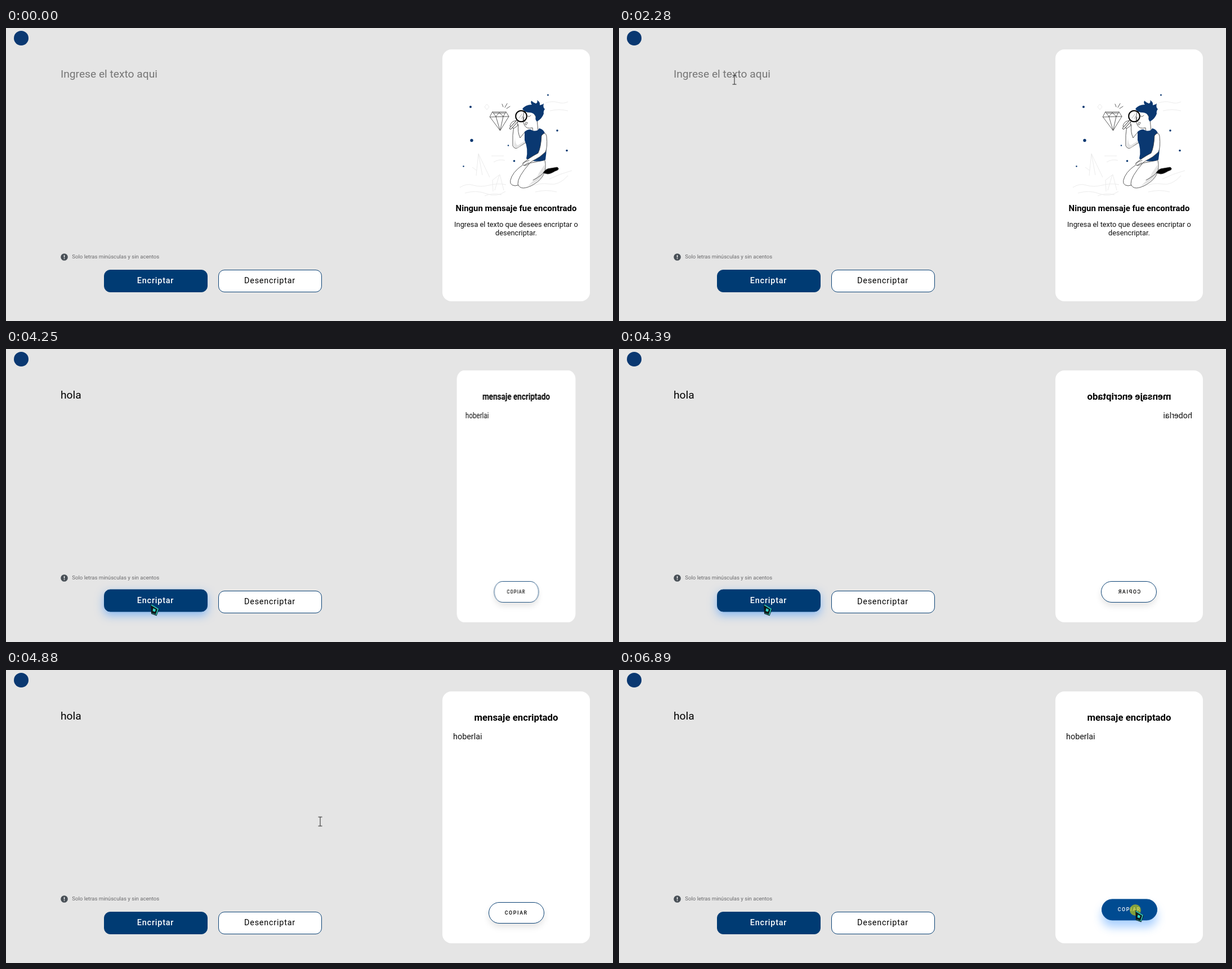
Write an HTML page that moves like this. It is 1078 px wide and 520 px high and loops after 6960 ms.

```html
<!DOCTYPE html>
<html lang="es">
<head>
<meta charset="utf-8">
<title>Encriptador de texto</title>
<style>
  html, body { margin: 0; width: 100%; height: 100%; overflow: hidden; background: #e5e5e5; }
  body { position: relative; font-family: Roboto, sans-serif; color: #000; }
  body *, #card * { box-sizing: border-box; }
  .abs, .btn { position: absolute; white-space: pre; }
  .input { left: 97px; top: 71px; font-size: 19.2px; line-height: 22.5px; }
  #hint { color: #757575; }
  #caret { left: 97px; top: 70.5px; width: 1px; height: 23px; background: #000; }
  #logo { left: 14px; top: 5px; width: 26px; height: 26px; border-radius: 50%; background: #0a3871; }
  #note { left: 117.3px; top: 400px; font-size: 9.6px; line-height: 12px; color: #6a6a6c; }
  #info { left: 97px; top: 399.5px; }
  .btn { display: flex; align-items: center; justify-content: center; border: 1px solid #0a4174; background: #fff; }
  .main { top: 429px; width: 184px; height: 39.5px; border-radius: 11px; font-size: 14.4px; letter-spacing: .8px; }
  #encrypt { left: 173.5px; background: #003b73; border-color: #003b73; color: #fff; font-weight: 500; }
  #decrypt { left: 376.5px; }
  #card { left: 775px; top: 38px; width: 262px; height: 447px; border-radius: 16px; background: #fff; }
  #card svg { position: absolute; left: 0; top: 0; }
  #copy { left: 82px; top: 374px; width: 98.5px; height: 37.5px; border-radius: 19px;
          font-size: 8.8px; font-weight: 500; letter-spacing: 1.6px; }
  #result { position: absolute; inset: 0; }
  #pointer { left: 0; top: 0; width: 0; height: 0; }
  #pointer svg { position: absolute; left: -20px; top: -20px; }
  .line { fill: none; stroke: #333; stroke-width: .8; stroke-linecap: round; stroke-linejoin: round; }
  .skin { fill: #fff; }
  .faint { fill: none; stroke: #e9e9e9; stroke-width: .9; }
</style>
</head>
<body>
<div class="abs" id="logo"></div>
<div class="abs input" id="hint">Ingrese el texto aqui</div>
<div class="abs input" id="typed"><span>h</span><span>o</span><span>l</span><span>a</span></div>
<div class="abs" id="caret"></div>

<svg class="abs" id="info" width="13" height="13" viewBox="0 0 13 13">
  <circle cx="6.5" cy="6.5" r="6.3" fill="#495057"/>
  <path d="M6.5 3.1V7.2M6.5 8.6V10" stroke="#fff" stroke-width="1.4"/>
</svg>
<div class="abs" id="note">Solo letras minúsculas y sin acentos</div>
<div class="btn main" id="encrypt">Encriptar</div>
<div class="btn main" id="decrypt">Desencriptar</div>

<div class="abs" id="card">
  <svg id="empty" width="262" height="447" viewBox="775 38 262 447">
    <g class="faint">
      <path d="M806 283q12-8 24-4t28 0 30-1M815 293q20-6 38 1t34-4M850 298q14-6 30-2M862 227h22M866 238q10-6 20-3M835 262l4-39 20 42M839 223l7 38M865 290l-1-20 13-10 7 28M868 288l8-27M828 247l8 6M930 282q18-8 35-5t33-15M965 268q18-9 40-15M940 291q20-5 38 0M958 133q12-4 22-1t18-1M966 147q16-4 32 0M850 140l4-5 4 5-4 5z"/>
    </g>
    <g fill="#0a3871">
      <circle cx="825" cy="140" r="2"/><circle cx="827" cy="199.5" r="2.7"/>
      <circle cx="892" cy="208.5" r="1.2"/><circle cx="902.5" cy="236" r="1.8"/>
      <circle cx="812.5" cy="245.5" r="1.3"/><circle cx="979" cy="182" r="1.8"/>
      <circle cx="996" cy="217.5" r="1.8"/><circle cx="962.5" cy="119" r="1.4"/>
    </g>
    <g class="line">
      <path d="M864 149H888L893 157 877.500 182 859.500 158zM859.500 158L893 157M864 149L870 157 876 150 883 157 888 149M870 157L877.500 182 883 157M866 151H886M883 140L881 135M886 141L890 134M889 143L895 139"/>
      <path class="skin" d="M928 237Q905 249 898 264 891 279 904 280 920 279 930 262z"/>
      <path class="skin" d="M957 235Q963 262 938 277 914 291 909 277 908 265 930 240z"/>
      <path d="M956 243Q961 260 940 274L926 281Q945 264 946 258z" fill="#e4e4e4" stroke="none"/>
      <path d="M936 270Q952 262 959 252"/>
      <path d="M954 257Q959 249 967 249L979 247Q985 251 975 254 967 259 962 259z" fill="#000"/>
      <path class="skin" d="M902 173Q899 190 900 209 904 217 911 211L925 202 922 184 913 195Q908 184 910 172z"/>
      <path d="M904 194Q904 207 909 208L922 200 923 202 911 211Q905 216 902 209z" fill="#e4e4e4" stroke="none"/>
      <path class="skin" d="M920 149Q916 164 921 173 925 180 935 177L936 184 945 183 943 162 936 148z"/>
    </g>
    <path fill="#0a3871" d="M917 144Q922 136 934 136 931 133 933 129 937 133 941 134 945 132 943 128 949 131 948 137 953 136 955 134 953 141 957 144 954 147 955 152 952 161 943 166 939 163 941 157 937 150 930 150 922 150 917 144z"/>
    <path fill="#0a3871" d="M921 184Q930 177 935 182 944 184 947 178 955 180 957 187 962 210 958 234 940 240 924 232 928 215 921 199z"/>
    <g class="line">
      <path class="skin" d="M951 191Q958 182 960 192 962 212 958 220 948 230 935 236L925 243Q917 246 918 240 928 231 945 222 950 212 951 191z"/>
      <path d="M918 240Q924 236 929 235M920 244L928 239M926 156q3 3 6-1M920 158l-1 7 3 1M926 168q-4-2-4 3 2 3 3-1z"/>
      <path class="skin" d="M895 174Q897 166 903 165 907 163 909 168L908 174 902 178z"/>
      <path d="M908 165L896 178" stroke="#222" stroke-width="4"/>
      <path d="M908 165L896 178" stroke="#fff" stroke-width="2.400"/>
      <path d="M911 160l5-7M915 161l5-7" stroke="#999"/>
    </g>
    <circle cx="915" cy="156.500" r="9.800" fill="none" stroke="#000" stroke-width="2"/>
    <g text-anchor="middle">
      <text x="906" y="325" font-size="14.98" font-weight="700">Ningun mensaje fue encontrado</text>
      <text font-size="12.8" fill="#111"><tspan x="906" y="353">Ingresa el texto que desees encriptar o</tspan><tspan x="906" y="368">desencriptar.</tspan></text>
    </g>
  </svg>
  <div id="result">
    <svg width="262" height="447" viewBox="775 38 262 447">
      <text x="906" y="90" font-size="16.8" font-weight="700" text-anchor="middle">mensaje encriptado</text>
      <text x="794" y="123" font-size="14.4" fill="#111">hoberlai</text>
    </svg>
    <div class="btn" id="copy">COPIAR</div>
  </div>
</div>

<div class="abs" id="pointer">
  <svg width="60" height="60" viewBox="-20 -20 60 60">
    <circle id="press" r="10" fill="#c3c914" fill-opacity=".68"/>
    <g id="arrow">
      <path d="M0 0L15 9.500 10.500 21.500 1 18z" fill="#101719"/>
      <path d="M1 2L13 9.500 9.500 20" fill="none" stroke="#2cc5b9" stroke-width="1.800"/>
      <path d="M10 19.500L2 17" stroke="#27877f" stroke-width="1.200"/>
      <path d="M4.500 8L9 10.500 7.500 14.500 3.500 13z" fill="#32d8ca"/>
    </g>
    <path id="beam" d="M-3.500-8H3.500M0-8V8M-3.500 8H3.500" stroke="#222" fill="none"/>
  </svg>
</div>

<script>
const LOOP = 6960;
const $ = id => document.getElementById(id);

// keys: [time in ms, keyframe properties, easing towards the next key]
const track = (el, keys, easing = 'linear') => el.animate(
  keys.map(([t, props, ease]) => ({ offset: t / LOOP, easing: ease || easing, ...props })),
  { duration: LOOP, iterations: Infinity });

const show = (el, ...spans) => track(el, [
  ...(spans[0][0] ? [[0, { opacity: 0 }]] : []),
  ...spans.flatMap(([on, off = LOOP]) => [[on, { opacity: 1 }], [off, { opacity: off < LOOP ? 0 : 1 }]])
], 'step-end');

const move = (x, y = 0) => ({ transform: `translate(${x}px, ${y}px)` });

// Typing
const typedAt = [2610, 2680, 2880, 2950];
const caretX = [10.6, 21.5, 26.2, 36.6];
show($('hint'), [0, 2610]);
[...$('typed').children].forEach((letter, i) => show(letter, [typedAt[i]]));
show($('caret'), [1750, 2280], [2610, 3480], [4010, 4140]);
track($('caret'), [[0, move(0)], ...typedAt.map((t, i) => [t, move(caretX[i])])], 'step-end');

// Pointer
const path = [
  [0, 990, 508], [130, 990, 508], [270, 914, 458], [400, 836, 388], [550, 765, 290],
  [680, 725, 212], [820, 707, 158], [890, 695, 163], [1030, 660, 170], [1250, 500, 150],
  [1400, 325, 112], [1530, 212, 93], [1670, 205, 92], [3300, 205, 92], [3350, 206, 110],
  [3560, 228, 368], [3760, 235, 398], [3830, 245, 419], [3960, 257, 452], [4600, 257, 452],
  [4670, 310, 400], [4800, 450, 305], [4950, 650, 238], [5090, 833, 226], [5160, 911, 248],
  [5230, 960, 272], [5300, 981, 296], [5400, 984, 358], [5510, 982, 404], [5620, 968, 417],
  [5720, 950, 418], [5860, 940, 421], [6200, 925, 424], [6560, 917, 426], [LOOP, 917, 426]
];
track($('pointer'), path.map(([t, x, y]) => [t, move(x, y)]));
show($('arrow'), [130, 1090], [3760, 4680], [4930]);
show($('beam'), [1090, 2610], [3350, 3760], [4680, 4930]);
show($('press'), [1740, 1950], [4110, 4250], [6820]);

// Button hovers
const rest = { transform: 'translateY(0)', boxShadow: '0 6px 16px rgba(46,140,255,0)' };
const raised = { transform: 'translateY(-2.5px)', boxShadow: '0 6px 16px rgba(46,140,255,.5)' };
track($('encrypt'), [[0, rest], [3870, rest, 'ease'], [4110, raised], [4640, raised, 'ease'],
  [4880, rest], [LOOP, rest]]);

const plain = { transform: 'translateY(0)', boxShadow: '0 6.4px 12px rgba(0,0,0,.1)',
  backgroundColor: '#fff', borderColor: '#0a4174', color: '#000' };
const active = { transform: 'translateY(-5.6px)', boxShadow: '0 12px 16px rgba(46,140,255,.4)',
  backgroundColor: '#004b91', borderColor: '#004b91', color: '#fff' };
track($('copy'), [[0, plain], [5800, plain, 'ease'], [6100, active], [LOOP, active]]);

// Card turn
const turn = deg => ({ transform: `rotateY(${deg}deg)` });
track($('card'), [[0, turn(0)], [4140, turn(0), 'ease-in-out'], [4640, turn(360)], [LOOP, turn(360)]]);
show($('empty'), [0, 4140]);
show($('result'), [4140]);
</script>
</body>
</html>
```
